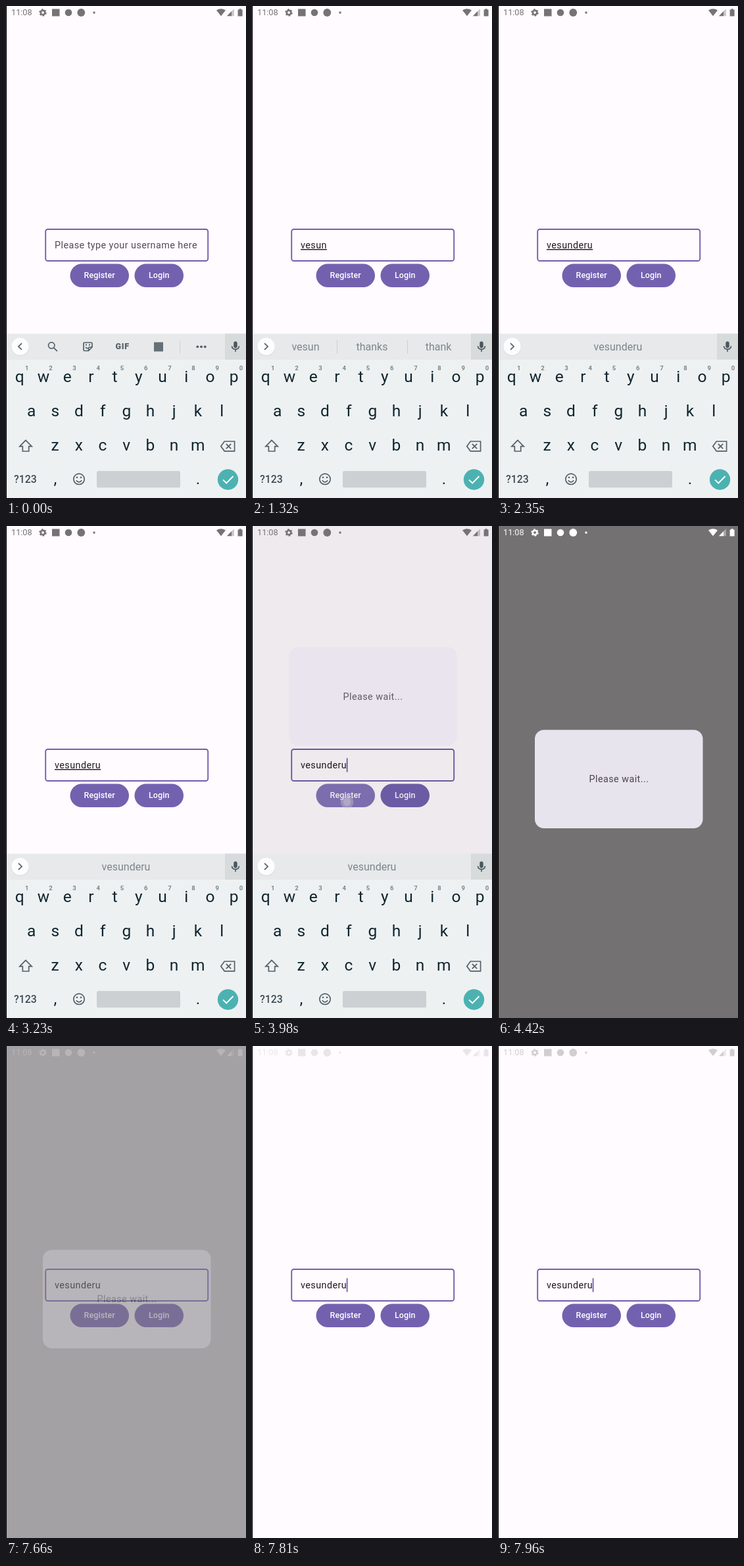
Write an HTML page that moves like this. It is 365 by 747 pixels and loops after 8000 ms.

```html
<!DOCTYPE html>
<html lang="en">
<head>
<meta charset="utf-8">
<title>Login screen</title>
<style>
  html, body { margin: 0; width: 100%; height: 100%; overflow: hidden; background: #fffbfe; }
  svg { display: block; width: 365px; height: 747px; font-family: Roboto, sans-serif; }
  text { white-space: pre; }
  .body { font-size: 14.35px; letter-spacing: .45px; }
  .label { font-size: 12.5px; font-weight: 500; fill: #fff; text-anchor: middle; letter-spacing: .09px; }
  .key { font-size: 24.5px; fill: #10262f; text-anchor: middle; }
  .hint { font-size: 9.5px; font-weight: 700; fill: #7b8589; text-anchor: middle; }
  .word { font-size: 16px; fill: #7d878b; text-anchor: middle; }
  .line { fill: none; stroke: #536067; stroke-width: 1.7; }
  .status { font-size: 12.7px; color: #757375; fill: currentColor; }
  .status, .app, .scrim, .dialog, .keyboard, .cursor, .touch, .press, .glow {
    animation: 8s step-end infinite;
  }
  .status { animation-name: status; }
  .app { animation-name: app; }
  .scrim { animation-name: scrim; }
  .dialog { animation-name: dialog; }
  .keyboard { animation-name: keyboard; }
  .cursor { animation-name: blink; }
  .touch { animation-name: touch; }
  .press { animation-name: press; }
  .glow { animation-name: glow; }

  @keyframes status {
    0% { color: #757375; }
    51.5% { color: #fff; }
    95.75% { color: #b7b5b7; }
    97.625% { color: #e9e6e9; }
    99.5%, 100% { color: #d1ced2; }
  }
  @keyframes app { 0%, 95.75%, 100% { opacity: 1; } 51.5% { opacity: 0; } }
  @keyframes scrim {
    0%, 97.625%, 100% { opacity: 0; }
    49.75% { opacity: .065; }
    51.5% { opacity: .55; }
    95.75% { opacity: .36; }
  }
  @keyframes dialog {
    0%, 97.625%, 100% { opacity: 0; transform: none; }
    49.75% { opacity: .87; transform: translateY(-125.5px); }
    51.5% { opacity: .96; transform: translateY(-16px); }
    53.375% { opacity: .98; transform: none; }
    55.25% { opacity: 1; transform: none; }
    95.75% { opacity: .3; transform: none; }
  }
  @keyframes keyboard {
    0% { transform: none; }
    51.5% { transform: translateY(218px); }
    53.375%, 100% { transform: translateY(260px); }
  }
  @keyframes blink {
    0%, 16.5%, 29.375%, 40.375%, 95.75% { opacity: 0; }
    5.5%, 18.375%, 34.875%, 47.875%, 97.625%, 100% { opacity: 1; }
  }
  @keyframes touch { 0%, 51.5%, 100% { opacity: 0; } 47.875% { opacity: 1; } }
  @keyframes press { 0%, 49.75%, 100% { opacity: 0; } 47.875% { opacity: .12; } }
  @keyframes glow { 0%, 51.5%, 100% { opacity: 0; } 49.75% { opacity: .13; } }
</style>
</head>
<body>
<svg viewBox="0 0 365 747">
  <rect width="365" height="747" fill="#fffbfe"/>

  <g class="app">
    <rect x="60.2" y="339" width="247" height="48" rx="3.5" fill="none" stroke="#715fae" stroke-width="1.9"/>
    <text class="body" id="hint" x="74" y="368" fill="#504b55">Please type your username here</text>
    <text class="body" id="typed" x="74" y="368" fill="#1c1b1f"></text>
    <rect class="cursor" id="cursor" y="352.5" width="1.6" height="21" fill="#6750a4"/>
    <rect id="button" x="97.5" y="391.5" width="89.5" height="35.5" rx="17.75" fill="#7361b0"/>
    <rect x="195.5" y="391.5" width="74.5" height="35.5" rx="17.75" fill="#7361b0"/>
    <circle class="press" cx="149" cy="413" r="14" fill="#fff"/>
    <rect class="glow" x="97.5" y="391.5" width="89.5" height="35.5" rx="17.75" fill="#fff"/>
    <text class="label" x="142.2" y="413.3">Register</text>
    <text class="label" x="232.7" y="413.3">Login</text>
    <g class="touch" fill="#d8d3e0">
      <circle cx="144.5" cy="419" r="10" opacity=".4"/>
      <circle cx="144.5" cy="419" r="6" opacity=".45"/>
    </g>
  </g>

  <rect class="scrim" width="365" height="747"/>

  <g class="dialog">
    <rect x="56" y="309.5" width="255.5" height="149.5" rx="14" fill="#e8e4ee"/>
    <text class="body" x="138.5" y="389" fill="#4a454e">Please wait...</text>
  </g>

  <g class="status">
    <text x="8" y="14.4">11:08</text>
    <circle cx="56" cy="10" r="3.2" fill="none" stroke="currentColor" stroke-width="2.6"/>
    <circle cx="56" cy="10" r="4.9" fill="none" stroke="currentColor" stroke-width="1.6" stroke-dasharray="2.6 2.53"/>
    <rect x="70" y="4.5" width="11.5" height="11"/>
    <circle cx="95" cy="10" r="5.3"/>
    <circle cx="114.3" cy="10" r="5.9"/>
    <circle cx="134" cy="10" r="1.7"/>
    <path d="M320 6.6Q327 1.8 334 6.6L327 15.2Z"/>
    <path d="M336 15.2L346.8 4.2V15.2Z" opacity=".4"/>
    <path d="M336 15.2L343 8V15.2Z"/>
    <path d="M352.6 5.6h2V4.2h3v1.4h2v10h-7Z"/>
  </g>

  <g class="keyboard">
    <rect y="497.5" width="365" height="40" fill="#e7e9ea"/>
    <rect x="333" y="497.5" width="32" height="40" fill="#d8dbdc"/>
    <rect y="537" width="365" height="210" fill="#eef1f2"/>
    <circle cx="21.5" cy="517.8" r="13.5" fill="#d6d9da"/>
    <circle cx="21.5" cy="517" r="13.2" fill="#fdfcfe"/>
    <path class="line" id="chevron" d="M24 512.2L19 517L24 521.8"/>

    <g id="tools">
      <circle class="line" cx="69.2" cy="515.3" r="4.7"/>
      <path class="line" d="M72.6 518.8L78 524.2" stroke-width="2"/>
      <path class="line" d="M119.5 511H129.5Q131 511 131 512.5V518L125.5 523.5H119.5Q118 523.5 118 522V512.5Q118 511 119.5 511ZM131 518H127Q125.5 518 125.5 519.5V523.5M121 518Q122.5 520 124.5 519.6"/>
      <path d="M121 513.6h2v2h-2ZM126 513.6h2v2h-2Z" fill="#536067"/>
      <text x="177.2" y="521.4" font-size="12.5" font-weight="900" letter-spacing=".7" text-anchor="middle" fill="#536067">GIF</text>
      <rect x="225" y="510.5" width="14" height="14" fill="#647075"/>
      <path d="M264.5 508V528" stroke="#cfd3d5"/>
      <g fill="#536067">
        <circle cx="291.3" cy="517.3" r="1.9"/><circle cx="297" cy="517.3" r="1.9"/><circle cx="302.7" cy="517.3" r="1.9"/>
      </g>
    </g>
    <g id="strip">
      <path id="bars" d="M129.5 507V528M236.5 507V528" stroke="#cbd0d2"/>
      <text class="word" x="81.5" y="523.3"></text>
      <text class="word" x="182.5" y="523.3"></text>
      <text class="word" x="283.5" y="523.3"></text>
    </g>

    <rect x="346.3" y="509.3" width="5.4" height="10" rx="2.7" fill="#4b585e"/>
    <path class="line" d="M343.6 516.3Q343.6 521.2 349 521.2T354.4 516.3M349 521V525" stroke-width="1.5"/>

    <g id="keys"></g>

    <path class="line" d="M30 659.3L39.2 668.6H34.7V676H25.3V668.6H20.8Z"/>
    <path class="line" d="M332.3 661H347.6V675.8H332.3L326.8 668.4ZM334.8 664.8L342.2 672.2M342.2 664.8L334.8 672.2"/>
    <text x="12" y="724.3" font-size="15.8" font-weight="500" fill="#3d4c53">?123</text>
    <circle class="line" cx="111" cy="718.3" r="8.2" stroke-width="1.6"/>
    <path class="line" d="M106.8 720.3Q111 725.6 115.2 720.3" stroke-width="1.6"/>
    <g fill="#536067"><circle cx="108" cy="715.8" r="1.3"/><circle cx="114" cy="715.8" r="1.3"/></g>
    <rect x="138" y="706" width="127" height="25.3" rx="2.5" fill="#cdd0d2"/>
    <circle cx="337.5" cy="719" r="15.7" fill="#4cb2b1"/>
    <path d="M330 719.3L335.2 724.5L345.5 714" fill="none" stroke="#fff" stroke-width="1.9"/>
  </g>

  <rect width="1" height="747"/>
</svg>
<script>
  const $ = id => document.getElementById(id);
  const LOOP = 8000;

  // time, typed text, suggested words
  const steps = [
    [0, "", []],
    [300, "v", ["v", "via", "very"]],
    [440, "ve", ["ve", "very", "vest"]],
    [590, "ves", ["ves", "vest", "vessel"]],
    [740, "vesu", ["vesu", "venue", "usual"]],
    [880, "vesun", ["vesun", "thanks", "thank"]],
    [1470, "vesund", ["", "vesund", ""]],
    [1620, "vesunder", ["vesunder", "sunder", "understand"]],
    [1760, "vesunderu", ["", "vesunderu", ""]]
  ];

  function addText(cls, x, y, str) {
    const el = document.createElementNS("http://www.w3.org/2000/svg", "text");
    el.setAttribute("class", cls);
    el.setAttribute("x", x);
    el.setAttribute("y", y);
    el.textContent = str;
    $("keys").append(el);
  }

  const rows = [["qwertyuiop", 20.8, 570.7], ["asdfghjkl", 38.6, 622.8], ["zxcvbnm", 74.6, 675.3]];
  for (const [letters, x, y] of rows)
    [...letters].forEach((c, i) => addText("key", x + i * 36.2, y, c));
  [..."1234567890"].forEach((c, i) => addText("hint", 31.7 + i * 36.2, 553, c));
  addText("key", 75, 726, ",");
  addText("key", 292, 726, ".");

  const words = document.querySelectorAll(".word");
  const show = (id, on) => $(id).setAttribute("visibility", on ? "visible" : "hidden");
  let shown = null;

  function render(step) {
    const [, text, list] = step;
    const typing = text !== "";
    $("typed").textContent = text;
    $("cursor").setAttribute("x", 73.6 + $("typed").getComputedTextLength());
    words.forEach((el, i) => el.textContent = list[i] || "");
    show("bars", Boolean(list[0]));
    show("hint", !typing);
    show("tools", !typing);
    $("chevron").setAttribute("transform", typing ? "rotate(180 21.5 517)" : "");
  }

  let start;
  function tick(now) {
    start ??= now;
    const t = (now - start) % LOOP;
    const step = steps.findLast(s => t >= s[0]);
    if (step !== shown) render(shown = step);
    $("typed").setAttribute("text-decoration", t < 3980 ? "underline" : "none");
    requestAnimationFrame(tick);
  }
  render(shown = steps[0]);
  requestAnimationFrame(tick);
</script>
</body>
</html>
```
